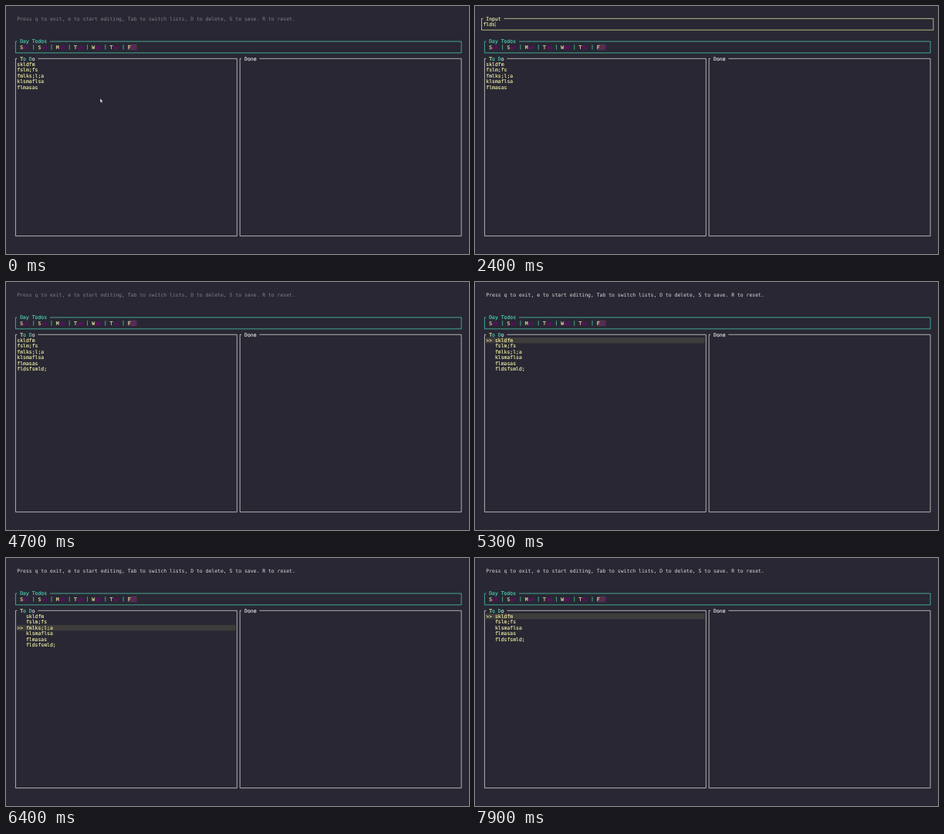
An HTML page for the animation above (8 s loop, 600 px wide and 322 px high).

```html
<!DOCTYPE html>
<html lang="en">
<head>
<meta charset="utf-8">
<title>Day Todos</title>
<style>
  html, body { margin: 0; width: 100%; height: 100%; overflow: hidden; background: #282733; }
  svg { display: block; width: 600px; height: 322px; }
  text { font: 6.44px "DejaVu Sans Mono", monospace; white-space: pre; text-rendering: geometricPrecision; }
  text, tspan { fill: currentColor; }
  .medium, .medium tspan { stroke: currentColor; stroke-width: .16; }
  path { fill: none; stroke-width: .75; }
</style>
</head>
<body>
<svg viewBox="0 0 600 322"><g id="fixed"></g><g id="live"></g></svg>
<script>
const LOOP = 8000;
const YELLOW = '#ebe8a0', TEAL = '#4fceb2', WHITE = '#dededf', PURPLE = '#800080', DIM = '#828188';
const HELP = 'Press q to exit, e to start editing, Tab to switch lists, D to delete, S to save. R to reset.';
const TYPED = 'fldsfsmld;';
const ITEMS = ['skldfm', 'fslm;fs', 'fmlks;l;a', 'klsmaflsa', 'flmasas'];

// Terminal grid: left edge of a column, middle of a row
const CELL = 3.877, LINE = 7.43;
const colX = c => 6.6 + c * CELL;
const rowY = r => 16.3 + r * LINE;

const text = (c, r, s, color, weight = 'medium') =>
  `<text x="${colX(c)}" y="${rowY(r) + 2.3}" color="${color}" class="${weight}">${s}</text>`;
const span = (s, color) => `<tspan color="${color}">${s}</tspan>`;
const bar = (c, r, cells, fill) =>
  `<rect x="${colX(c)}" y="${rowY(r) - LINE / 2}" width="${cells * CELL}" height="${LINE}" fill="${fill}"/>`;

function box(c0, r0, c1, r1, title, color, label = title) {
  const left = colX(c0 + .5), right = colX(c1 + .5), top = rowY(r0), bottom = rowY(r1);
  return `<path stroke="${color}" d="M${colX(c0 + 1)} ${top}H${left}V${bottom}H${right}V${top}H${colX(c0 + 3 + title.length)}"/>`
    + text(c0 + 2, r0, label, color);
}

function tabs() {
  return ['Sat', 'Sun', 'Mon', 'Tue', 'Wed', 'Thu', 'Fri'].map((day, i) => {
    const c = 3 + i * 6, x = colX(c + 4.5), last = i === 6;
    return (last ? bar(c, 5, 3, '#4f364b')
      : `<path stroke="${TEAL}" d="M${x} ${rowY(5) - 3.2}v6.4"/>`)
      + text(c, 5, day[0] + span(day.slice(1), PURPLE), YELLOW);
  }).join('');
}

const todoLabel = span('T', YELLOW) + span('o D', TEAL) + span('o', WHITE);
document.getElementById('fixed').innerHTML =
  box(1, 4, 150, 6, 'Day Todos', TEAL) + tabs()
  + box(1, 7, 75, 38, 'To Do', WHITE, todoLabel)
  + box(76, 7, 150, 38, 'Done', WHITE);

function selectedRow(t) {
  if (t >= 7600) return 0;
  if (t < 5000 || t >= 6500) return -1;
  return t < 5600 ? 0 : t < 6100 ? 1 : 2;
}

function inputBox(t) {
  const count = t < 3300 ? Math.max(0, Math.min(TYPED.length, Math.floor((t - 2000) / 100))) : 0;
  const x = colX(1 + count) + .4;
  return box(0, 0, 151, 2, 'Input', YELLOW)
    + text(1, 1, TYPED.slice(0, count), YELLOW)
    + `<path stroke="#a5a48a" d="M${x} ${rowY(1) - 3.5}v7"/>`;
}

function list(t, selected) {
  const items = t >= 3300 ? [...ITEMS, TYPED] : [...ITEMS];
  if (t >= 6500) items.splice(2, 1);
  return items.map((item, i) => {
    const active = i === selected;
    const prefix = selected < 0 ? '' : active ? '&gt;&gt; ' : '   ';
    return (active ? bar(2, 8 + i, 73, '#3e3d3b') : '') + text(2, 8 + i, prefix + item, YELLOW);
  }).join('');
}

function scene(t) {
  const selected = selectedRow(t);
  const editing = t >= 1400 && t < 4200;
  const pointer = t < 1400
    ? '<path d="M122 120v5.2l1.2-1 .9 1.9.9-.4-.8-1.8h1.5z" style="fill:#e4e4e6;stroke:#181820;stroke-width:.3"/>' : '';
  return (editing ? inputBox(t) : text(2, 0, HELP, selected < 0 ? DIM : WHITE, 'regular'))
    + list(t, selected) + pointer;
}

const live = document.getElementById('live');
let shown = '';
function draw(now) {
  const next = scene(now % LOOP);
  if (next !== shown) live.innerHTML = shown = next;
  requestAnimationFrame(draw);
}
draw(performance.now());
</script>
</body>
</html>
```
